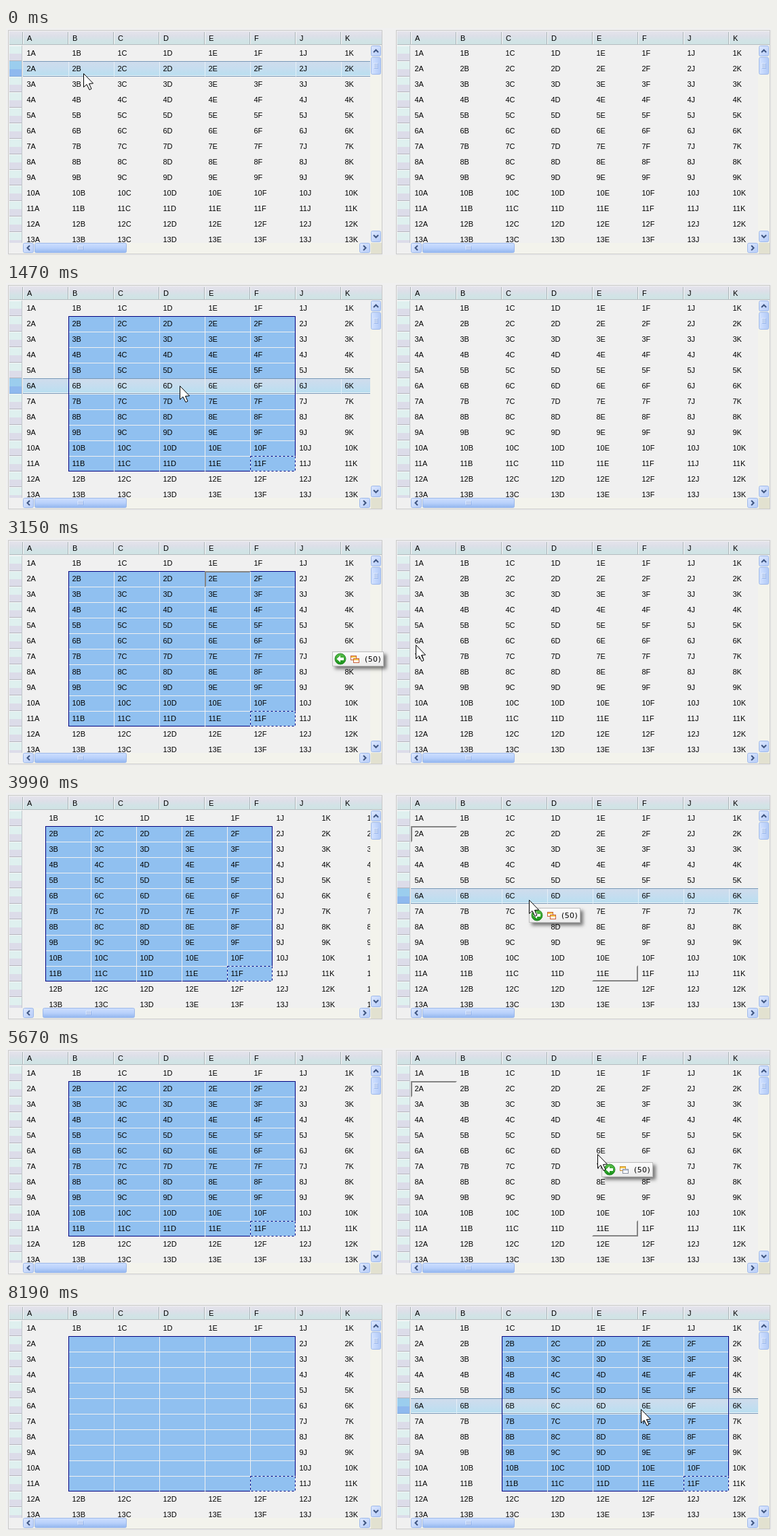
These frames come from a looping animation (1128 px wide and 336 px high, 9.45 s). An HTML page with a canvas:

```html
<!DOCTYPE html>
<html lang="en">
<head>
<meta charset="utf-8">
<title>Dragging cells between grids</title>
<style>
html, body { margin: 0; width: 100%; height: 100%; overflow: hidden; background: #f0f0f0; }
canvas { display: block; }
</style>
</head>
<body>
<canvas id="stage" width="1128" height="336"></canvas>
<script>
const g = document.getElementById('stage').getContext('2d');
const LOOP = 9450, COLW = 67, ROWH = 23, GAP = 572;
const LETTERS = 'ABCDEFJKL';
const NAVY = '#000080', LINE = '#f0f0f0';
const FONT = '11px "Liberation Sans", Arial, sans-serif';

// Each step overrides only what changes at its time.
const steps = [
  [0, { cur: [114, 67], hover: 2, pressed: false, header: 2, sel: null, scroll: 0,
        mark: null, tag: null, copy: false, hover2: 0, mark2: null, dropped: false, cleared: false }],
  [210, { cur: [214, 134], hover: 5, header: 5, pressed: true, sel: [1, 2, 2, 5] }],
  [630, { cur: [392, 252], hover: 9, header: 9, sel: [1, 2, 5, 9] }],
  [1050, { cur: [398, 273], hover: 11, header: 11, sel: [1, 2, 5, 11] }],
  [1470, { cur: [256, 152], hover: 6, header: 6, pressed: false }],
  [1890, { cur: [256, 156], pressed: true }],
  [2310, { cur: [272, 157], tag: [270, 165] }],
  [2730, { cur: [386, 157], tag: [366, 167], hover: 0, header: 0, mark: 92 }],
  [3150, { cur: [604, 158], tag: [481, 168], mark: 293 }],
  [3570, { cur: [688, 158], tag: [682, 169], mark: 360, scroll: 34 }],
  [3990, { cur: [771, 158], tag: [771, 170], mark: null, hover2: 6, mark2: 25 }],
  [4410, { cur: [820, 158], tag: [822, 170], scroll: 0, hover2: 0 }],
  [4830, { cur: [872, 158], tag: [878, 169] }],
  [5250, { cur: [864, 157], copy: true }],
  [5670, { cur: [872, 157] }],
  [6090, { cur: [915, 157], tag: [920, 169], mark2: 92 }],
  [6510, { cur: [936, 157], tag: [942, 169], mark2: 159 }],
  [6930, { tag: null, mark2: null, dropped: true }],
  [8190, { hover2: 6, cleared: true }]
];

const colX = c => 25 + c * COLW;
const rowY = r => 26 + (r - 1) * ROWH;

function box(x, y, w, h, fill) {
  g.fillStyle = fill;
  g.fillRect(x, y, w, h);
}

function grad(x0, y0, x1, y1, ...colors) {
  const f = g.createLinearGradient(x0, y0, x1, y1);
  colors.forEach((c, i) => f.addColorStop(i / (colors.length - 1), c));
  return f;
}

function poly(points, fill, stroke) {
  g.beginPath();
  points.forEach(([x, y]) => g.lineTo(x, y));
  g.closePath();
  if (fill) { g.fillStyle = fill; g.fill(); }
  if (stroke) { g.strokeStyle = stroke; g.lineWidth = 1; g.stroke(); }
}

function label(s, x, y, font = FONT) {
  g.font = font;
  g.fillStyle = '#000';
  g.fillText(s, x, y);
}

function clip(x, y, w, h, draw) {
  g.save();
  g.beginPath();
  g.rect(x, y, w, h);
  g.clip();
  draw();
  g.restore();
}

function plate(x, y, w, h, fill) {
  g.beginPath();
  g.roundRect(x + .5, y + .5, w - 1, h - 1, 2);
  g.fillStyle = fill;
  g.fill();
  g.strokeStyle = '#9db8ea';
  g.lineWidth = 1;
  g.stroke();
}

function arrowButton(x, y, w, h, angle) {
  plate(x, y, w, h, grad(x, y, x + w, y + h, '#dfe9fe', '#b4cbf8'));
  g.save();
  g.translate(x + w / 2, y + h / 2);
  g.rotate(angle);
  g.beginPath();
  g.moveTo(-3.5, 2);
  g.lineTo(0, -1.5);
  g.lineTo(3.5, 2);
  g.strokeStyle = '#3f5580';
  g.lineWidth = 2;
  g.stroke();
  g.restore();
}

function scrollbars(scroll) {
  box(537, 26, 17, 292, '#f3f3ec');
  box(25, 318, 513, 16, '#f3f3ec');
  box(538, 318, 16, 16, '#e2e1d0');
  arrowButton(538, 26, 15, 16, 0);
  arrowButton(538, 300, 15, 17, Math.PI);
  arrowButton(25, 318, 16, 15, -Math.PI / 2);
  arrowButton(521, 318, 16, 15, Math.PI / 2);
  plate(538, 43, 15, 26, grad(538, 0, 553, 0, '#d6e4ff', '#c2d6fc', '#b0c8f5'));
  const tx = 42 + Math.round(scroll * .36);
  plate(tx, 318, 136, 15, grad(0, 318, 0, 333, '#cfe0ff', '#b9d1fb', '#8fb4ee'));
  for (let i = 0; i < 4; i++) {
    box(542, 52 + i * 2, 6, 1, '#eef4ff');
    box(543, 53 + i * 2, 6, 1, '#8faee6');
    box(tx + 64 + i * 2, 322, 1, 6, '#eef4ff');
    box(tx + 65 + i * 2, 323, 1, 6, '#8faee6');
  }
}

function headers(lit) {
  box(5, 5, 549, 20, grad(0, 5, 0, 25, '#e5e4ec', '#dddfe8', '#d2e3e6', '#cfe3e3'));
  box(5, 24, 549, 1, '#b4bcc0');
  for (let c = 0; c < 8; c++) {
    const x = colX(c);
    box(x - 1, 6, 1, 18, '#a8b2b6');
    box(x, 6, 1, 18, '#fafafa');
    label(LETTERS[c], x + 6, 19);
  }
  clip(5, 25, 20, 293, () => {
    for (let r = 1; r <= 13; r++) {
      const y = rowY(r), on = r === lit;
      box(5, y, 19, 12, on ? '#9bcdee' : '#dff0ef');
      box(5, y + 12, 19, 10, on ? '#8fb9ee' : '#dcdce9');
      box(5, y + 22, 19, 1, on ? '#7fa8d8' : '#b4b4bc');
      if (!on) box(5, y, 19, 1, '#f6fafa');
    }
    box(23, 26, 1, 292, '#c2c8cc');
  });
}

function hoverRow(r, pressed) {
  const y = rowY(r);
  const fill = pressed ? grad(0, y, 0, y + ROWH, '#d3dff1', '#cfdfef', '#bfe0f2')
                       : grad(0, y, 0, y + ROWH, '#d0dcec', '#c5ddef', '#b7dff0');
  box(25, y, 512, ROWH, fill);
  box(25, y, 512, 1, '#7898b8');
  box(25, y + 22, 512, 1, '#7898b8');
  for (let c = 0; c < 8; c++) {
    box(colX(c) + 1, y + 21, 66, 1, '#eef6fa');
    if (c) box(colX(c), y + 1, 1, 22, 'rgba(255,255,255,.55)');
  }
}

function selectionFill([c0, r0, c1, r1], dx, skip) {
  for (let r = r0; r <= r1; r++) {
    for (let c = c0; c <= c1; c++) {
      const x = colX(c) - dx, y = rowY(r);
      if (r !== skip) {
        box(x, y, COLW, ROWH, '#90c0f0');
        box(x, y, COLW, 1, LINE);
      }
      box(x, y, 1, ROWH, LINE);
    }
  }
}

function selectionEdge([c0, r0, c1, r1], dx) {
  const x = colX(c0) - dx, y = rowY(r0);
  const w = (c1 - c0 + 1) * COLW, h = (r1 - r0 + 1) * ROWH;
  g.strokeStyle = NAVY;
  g.lineWidth = 1;
  g.strokeRect(x + .5, y + .5, w - 1, h - 1);
  for (let c = c0 + 1; c <= c1; c++) box(colX(c) - dx, y + h - 1, 1, 1, LINE);
  const ax = x + w - COLW + .5, ay = y + h - ROWH + .5;
  g.strokeStyle = LINE;
  g.strokeRect(ax, ay, 66, 22);
  g.strokeStyle = NAVY;
  g.setLineDash([3, 3]);
  g.strokeRect(ax, ay, 66, 22);
  g.setLineDash([]);
}

// Bevelled corners that frame a five by ten drop area.
function dropMarks(x) {
  const y = 49, r = x + 5 * COLW, b = y + 10 * ROWH;
  poly([[x, y], [x + 68, y], [x + 66, y + 2], [x + 2, y + 2], [x + 2, y + 22], [x, y + 24]], '#848484');
  poly([[r, b], [r - 68, b], [r - 66, b - 2], [r - 2, b - 2], [r - 2, b - 22], [r, b - 24]], '#848484');
}

function grid(dx, o) {
  g.save();
  g.translate(dx, 0);
  g.strokeStyle = '#c9c9c9';
  g.lineWidth = 1;
  g.strokeRect(3.5, 3.5, 551, 331);
  headers(o.header);
  clip(25, 26, 512, 292, () => {
    if (o.hover) hoverRow(o.hover, o.pressed);
    if (o.sel) {
      selectionFill(o.sel, o.scroll, o.hover);
      selectionEdge(o.sel, o.scroll);
    }
    for (let r = 1; r <= 13; r++) {
      for (let c = 0; c < LETTERS.length; c++) {
        label(o.text(c, r), colX(c) + 5.5 - o.scroll, rowY(r) + 15);
      }
    }
    if (o.mark) dropMarks(o.mark);
  });
  scrollbars(o.scroll);
  g.restore();
}

function miniWindow(x, y, edge, top) {
  box(x, y, 9, 7, edge);
  box(x + 1, y + 3, 7, 3, '#fff');
  box(x + 1, y + 1, 7, 2, top);
}

function dragTag([x, y], copy) {
  g.save();
  g.shadowColor = 'rgba(0,0,0,.5)';
  g.shadowBlur = 5;
  g.shadowOffsetX = g.shadowOffsetY = 4;
  box(x, y, 76, 22, '#f4f4f4');
  g.restore();
  box(x, y, 76, 22, grad(0, y, 0, y + 22, '#fcfcfc', '#ebebeb'));
  g.strokeStyle = '#bdbdbd';
  g.lineWidth = 1;
  g.strokeRect(x + .5, y + .5, 75, 21);
  g.beginPath();
  g.arc(x + 12, y + 11, 8, 0, 7);
  g.fillStyle = grad(0, y + 3, 0, y + 19, '#5cc04c', '#149018');
  g.fill();
  g.strokeStyle = '#2c8a2c';
  g.stroke();
  poly([[x + 6.5, y + 11], [x + 12, y + 6], [x + 12, y + 9], [x + 17, y + 9],
        [x + 17, y + 13], [x + 12, y + 13], [x + 12, y + 16]], '#fff');
  miniWindow(x + 27, y + 6, copy ? '#c89030' : '#c86038', '#f8c848');
  miniWindow(x + 31, y + 10, copy ? '#8890a0' : '#c86038', copy ? '#c8d0e0' : '#f8c848');
  g.letterSpacing = '.4px';
  label('(50)', x + 48, y + 15, '11px "DejaVu Sans", Verdana, sans-serif');
  g.letterSpacing = '0px';
}

function pointer([x, y]) {
  const shape = [[0, 0], [0, 20], [4.5, 16], [8.5, 24], [11.5, 22.5], [8, 15], [14, 14.5]];
  poly(shape.map(([a, b]) => [x + a + .5, y + b + .5]), '#fff', '#000');
}

const inside = (c, r, c0) => c >= c0 && c < c0 + 5 && r >= 2 && r <= 11;

function render(t) {
  const s = {};
  for (const [at, change] of steps) if (at <= t) Object.assign(s, change);
  box(0, 0, 1128, 336, '#f0f0f0');
  grid(0, {
    header: s.header, hover: s.hover, pressed: s.pressed, sel: s.sel, scroll: s.scroll, mark: s.mark,
    text: (c, r) => s.cleared && inside(c, r, 1) ? '' : r + LETTERS[c]
  });
  grid(GAP, {
    header: s.hover2, hover: s.hover2, pressed: false, scroll: 0, mark: s.mark2,
    sel: s.dropped ? [2, 2, 6, 11] : null,
    text: (c, r) => r + LETTERS[s.dropped && inside(c, r, 2) ? c - 1 : c]
  });
  if (s.tag) dragTag(s.tag, s.copy);
  pointer(s.cur);
}

let start;
function tick(now) {
  start ??= now;
  render((now - start) % LOOP);
  requestAnimationFrame(tick);
}
render(0);
requestAnimationFrame(tick);
</script>
</body>
</html>
```
